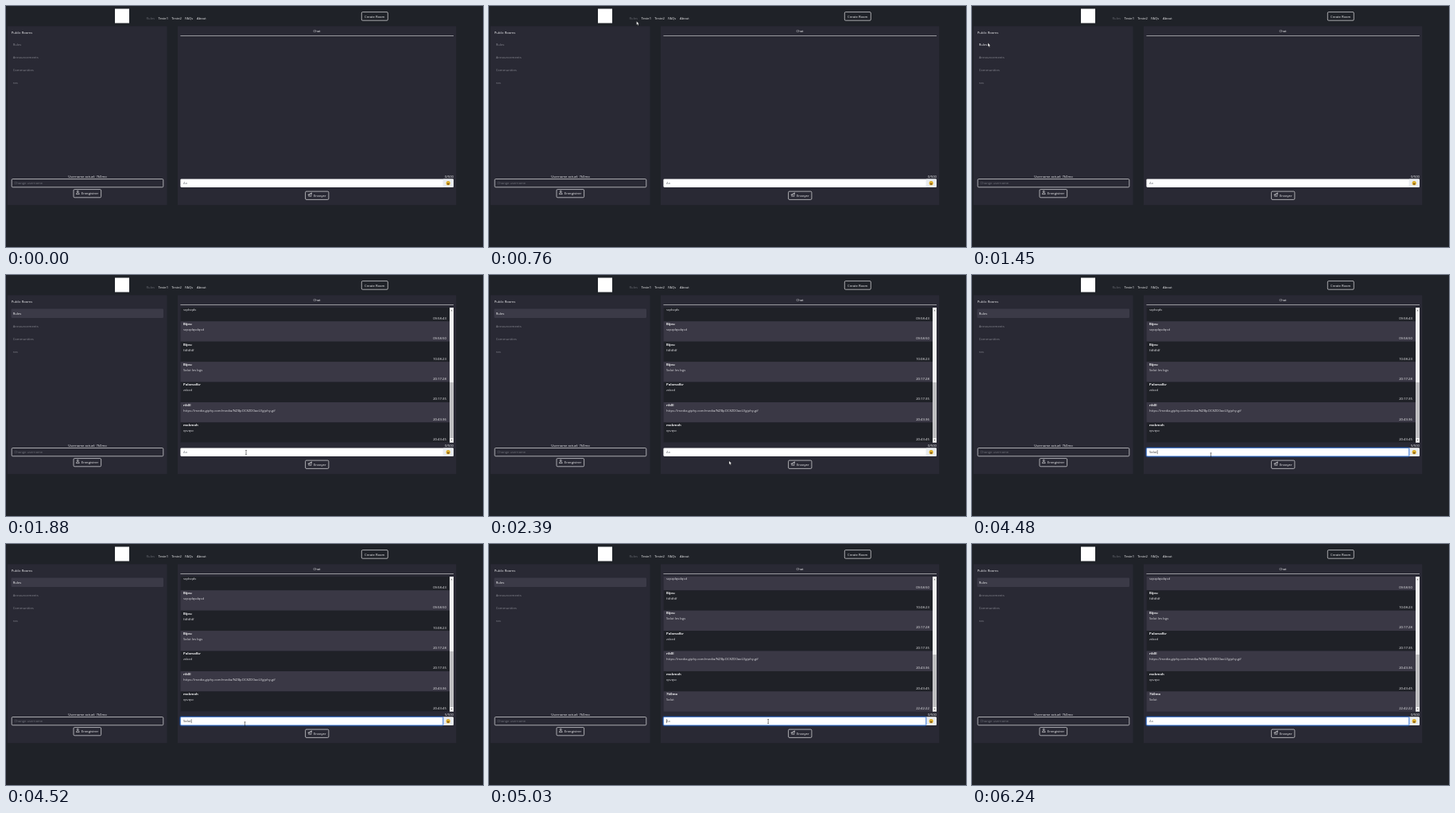
Write an HTML page that moves like this. It is 600 by 303 pixels and loops after 6.3 s.

```html
<!DOCTYPE html>
<html lang="fr">
<head>
<meta charset="utf-8">
<title>Chat</title>
<style>
html, body { margin: 0; width: 100%; height: 100%; overflow: hidden; background: #1f2228; }
svg { display: block; width: 100vw; height: 100vh; }
text { font: 4.2px "Open Sans", "Noto Sans", sans-serif; fill: #f1f1f3; white-space: pre; }
</style>
</head>
<body>
<svg id="stage" viewBox="0 0 600 303"></svg>
<script>
const LOOP = 6300, OPEN = 1540, FOCUS = 2480, SEND = 4600, LEAVE = 5600;
const TYPED = "Salut", TYPE_START = 3600, TYPE_STEP = 135;
const ROW = 25.42, LIST_TOP = 41, LIST_BOTTOM = 210.8;
const GREY = "#85868e", WHITE = "#f1f1f3";
const stage = document.getElementById("stage");

function add(parent, tag, attrs = {}, content = "") {
  const node = document.createElementNS("http://www.w3.org/2000/svg", tag);
  for (const key in attrs) node.setAttribute(key, attrs[key]);
  node.textContent = content;
  parent.appendChild(node);
  return node;
}
const rect = (x, y, width, height, fill, more = {}, parent = stage) =>
  add(parent, "rect", { x, y, width, height, fill, ...more });
const label = (x, y, content, style = "", parent = stage) =>
  add(parent, "text", { x, y, style }, content);
const path = (d, more, parent = stage) => add(parent, "path", { d, fill: "none", ...more });
const show = (node, on) => node.setAttribute("visibility", on ? "inherit" : "hidden");
const outline = (x, y, w, h) =>
  rect(x, y, w, h, "none", { stroke: WHITE, "stroke-width": 0.65, rx: 1.3 });

// Header
rect(0, 0, 600, 303, "#1f2228");
rect(137, 3.5, 18, 18, "#fff");
label(176.5, 17.1, "Rules", "fill:#66686f");
[[191.5, "Teste1"], [208.3, "Teste2"], [225.3, "FAQs"], [240, "About"]]
  .forEach(([x, name]) => label(x, 17.1, name));
outline(447.3, 7.6, 33, 10.6);
label(463.8, 14.5, "Create Room", "text-anchor:middle");

// Rooms panel
rect(1.8, 25.4, 200.7, 224.8, "#292934");
label(6.8, 35.2, "Public Rooms", "font-weight:500");
const activeRoom = rect(6.5, 42.6, 191.5, 11.4, "#3b3a47", { rx: 1.2 });
const rooms = ["Rules", "Announcements", "Communities", "sss"]
  .map((name, i) => label(8.7, 49.5 + i * 16.3, name, `fill:${GREY}`));
label(102.5, 215.5, "Username actuel: 7k0mo", "text-anchor:middle");
outline(7.2, 217.5, 190.6, 10.3);
label(10.6, 224.2, "Change username", "fill:#70727a");
outline(85, 230.6, 34.6, 10.2);
path("M88.4 236.6q0-2 1.9-2t1.9 2zM89.3 233.2a1 1 0 1 0 2 0a1 1 0 1 0-2 0",
  { stroke: WHITE, "stroke-width": 0.55 });
label(94.8, 237.3, "Enregistrer");

// Chat panel
rect(216, 25.4, 350.3, 224.8, "#292934");
label(391, 33, "Chat", "text-anchor:middle");
rect(219.4, 37, 343.6, 0.65, "#d5d5d9");

const clip = add(add(stage, "defs"), "clipPath", { id: "view" });
rect(219.4, LIST_TOP, 343.6, LIST_BOTTOM - LIST_TOP, "#000", {}, clip);
const view = add(stage, "g", { "clip-path": "url(#view)" });
const list = add(view, "g");
const messages = [
  ["Bijou", "sqdsqds", "09:58:43"],
  ["Bijou", "sqsqdqsdqsd", "09:58:50"],
  ["Bijou", "fdfdfdf", "10:08:23"],
  ["Bijou", "Salut les bgs", "20:17:28"],
  ["Palomafkr", "zdzzd", "20:17:35"],
  ["rik0l", "https://media.giphy.com/media/NZBpOC8ZD0aoU/giphy.gif", "20:43:36"],
  ["mokmoh", "qsvqsc", "20:43:45"],
  ["7k0mo", TYPED, "22:42:22"]
];
messages.forEach(([name, body, time], i) => {
  const y = LIST_BOTTOM - (7 - i) * ROW;
  rect(219.4, y, 338.6, ROW, i % 2 ? "#3a3845" : "#1f2127", {}, list);
  label(223, y + 4.8, name, "font-weight:700", list);
  label(223, y + 11.8, body, "fill:#dcdce0", list);
  label(553.8, y + 22.8, time, "text-anchor:end", list);
});
rect(558, LIST_TOP, 5, 170, "#f1f1f1", {}, view);
const thumb = rect(558.3, 135, 4.4, 70, "#bdbdbf", {}, view);
path("M559.4 45.2l1.1-1.3l1.1 1.3zM559.4 207l1.1 1.3l1.1-1.3z", { style: "fill:#555" }, view);

// Message field
const counter = label(563, 215.5, "", "text-anchor:end");
rect(219.4, 217.5, 343.6, 10.4, "#fff", { rx: 1.3 });
rect(549.6, 217.5, 13.4, 10.4, "#e9ecef", { rx: 1.3 });
add(stage, "circle", { cx: 556.2, cy: 222.7, r: 2.6, fill: "#e5b62f" });
path("M554.6 223.1h3.2q-.2 1.7-1.6 1.7t-1.6-1.7z", { style: "fill:#704713" });
path("M555.2 221.3v.7M557.2 221.3v.7", { stroke: "#704713", "stroke-width": 0.6 });
const focusRing = add(stage, "g");
rect(219, 217.1, 331, 11.2, "none",
  { rx: 1.5, stroke: "#0d6efd", "stroke-opacity": 0.3, "stroke-width": 1.8 }, focusRing);
rect(219.4, 217.5, 330.2, 10.4, "none", { rx: 1.3, stroke: "#4c7fcd", "stroke-width": 0.7 }, focusRing);
const field = label(223, 224.2, "");
const caret = rect(223, 220.2, 0.5, 5, "#222");
outline(376.6, 233.1, 29.3, 10.3);
path("M379.8 237.3l4.7-2.3l-.8 4.6l-1.6-.9l-1 1l-.1-1.7zM381 238l3.5-3",
  { stroke: WHITE, "stroke-width": 0.55 });
label(387, 239.8, "Envoyer");

// Pointer
const arrow = path("M0 0v4.4l1-.9l.8 1.7l.8-.4l-.8-1.6h1.4z",
  { style: "fill:#fff", stroke: "#111", "stroke-width": 0.25 });
const beam = path("M-.9-2.6h1.8M0-2.6v5.2M-.9 2.6h1.8", { stroke: "#222", "stroke-width": 0.55 });
const route = [
  [330, 590, 299], [600, 360, 90], [780, 180, 17], [940, 26, 34], [1150, 30, 43],
  [1350, 20, 46.5], [OPEN, 20, 46.5], [1640, 127, 108], [1800, 288, 214], [1880, 302, 223],
  [1980, 302, 224], [2160, 304, 244], [2330, 304, 244], [2440, 300.5, 226.4],
  [4640, 300.5, 226.4], [4900, 351.2, 223], [LEAVE, 351.2, 223]
];

function pointerAt(t) {
  const next = route.findIndex(point => point[0] > t);
  if (next < 1) return null;
  const [t0, x0, y0] = route[next - 1], [t1, x1, y1] = route[next];
  const k = (t - t0) / (t1 - t0), ease = k * k * (3 - 2 * k);
  return [x0 + (x1 - x0) * ease, y0 + (y1 - y0) * ease];
}

function drawPointer(t) {
  const point = pointerAt(t);
  const overField = point && point[0] > 219 && point[0] < 549 && point[1] > 217 && point[1] < 228;
  show(arrow, point && !overField);
  show(beam, overField);
  if (point) [arrow, beam].forEach(node => node.setAttribute("transform", `translate(${point})`));
}

function draw(t) {
  const opened = t >= OPEN, sent = t >= SEND;
  const hovered = t >= 1250;
  show(activeRoom, opened);
  rooms[0].style.fill = hovered ? WHITE : GREY;
  show(view, opened);
  list.setAttribute("transform", `translate(0 ${sent ? -ROW : 0})`);
  thumb.setAttribute("y", sent ? 139 : 135);
  thumb.setAttribute("height", sent ? 66 : 70);

  const typed = Math.max(0, Math.min(TYPED.length, Math.floor((t - TYPE_START) / TYPE_STEP) + 1));
  const count = sent ? 0 : typed;
  counter.textContent = `${count}/500`;
  field.textContent = count ? TYPED.slice(0, count) : "Aa";
  field.style.fill = count ? "#333" : "#7b7f85";
  focusRing.setAttribute("opacity", Math.max(0, Math.min(1, (t - FOCUS) / 150)));

  const lastKey = sent ? SEND : typed ? TYPE_START + (typed - 1) * TYPE_STEP : FOCUS;
  show(caret, t >= FOCUS && Math.floor((t - lastKey) / 530) % 2 === 0);
  caret.setAttribute("x", count ? 223.1 + field.getComputedTextLength() : 223);
  drawPointer(t);
}

const start = performance.now();
function tick() {
  draw((performance.now() - start) % LOOP);
  requestAnimationFrame(tick);
}
tick();
</script>
</body>
</html>
```
